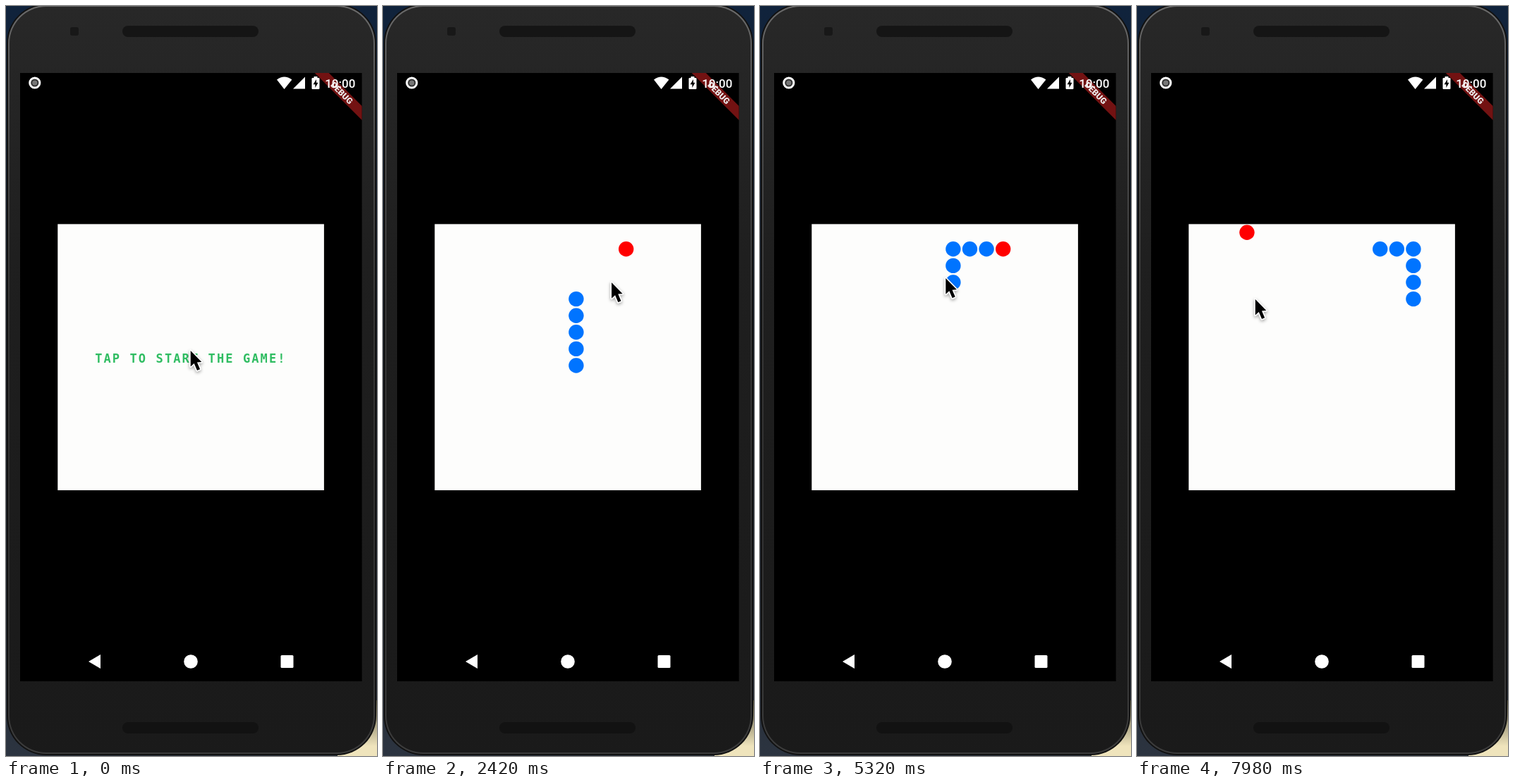
Animation, 526 px wide and 1064 px high, one loop 8 s. Source, as an HTML page with a canvas:

```html
<!DOCTYPE html>
<html lang="en">
<head>
<meta charset="utf-8">
<title>Snake</title>
<style>
html, body { margin: 0; width: 100%; height: 100%; overflow: hidden; background: #000; }
canvas { display: block; width: 526px; height: 1064px; }
</style>
</head>
<body>
<canvas id="stage" width="526" height="1064"></canvas>
<script>
const ctx = document.getElementById('stage').getContext('2d');
const LOOP = 8000, START = 660, TICK = 600;
const BOARD = { x: 73.3, y: 309.4, size: 377.6 }, CELL = BOARD.size / 16;
const FOODS = [[11, 1], [3, 0]];

// pointer stops: time, x, y
const POINTER = [
  [0, 262, 488], [800, 262, 488], [1450, 291, 458], [1800, 291, 458], [2900, 347, 346],
  [4700, 347, 346], [5700, 224, 404], [6000, 224, 404], [6600, 313, 419],
  [6950, 313, 419], [7800, 168, 415], [8000, 168, 415]
];

function fill(color) { ctx.fillStyle = color; ctx.fill(); }

function disc(x, y, r, color) {
  ctx.beginPath();
  ctx.arc(x, y, r, 0, Math.PI * 2);
  fill(color);
}

function poly(points, color) {
  ctx.beginPath();
  points.forEach(([x, y]) => ctx.lineTo(x, y));
  ctx.closePath();
  fill(color);
}

function box(x, y, w, h, r, color) {
  ctx.beginPath();
  ctx.roundRect(x, y, w, h, r);
  fill(color);
}

function gradient(x0, y0, x1, y1, ...colors) {
  const g = ctx.createLinearGradient(x0, y0, x1, y1);
  colors.forEach((c, i) => g.addColorStop(i / (colors.length - 1), c));
  return g;
}

function drawPhone() {
  ctx.fillStyle = gradient(0, 0, 0, 1064, '#10233c', '#151a22', '#2c3440');
  ctx.fillRect(0, 0, 526, 1064);
  ctx.fillStyle = gradient(0, 985, 0, 1050, '#55523f', '#efe4bc');
  ctx.fillRect(470, 985, 56, 79);

  box(1, -3, 524, 1066, 56, '#111');
  box(3, -1, 520, 1062, 54, gradient(0, 0, 0, 1064, '#6a6a6a', '#4a4a4a', '#383838', '#333', '#333', '#3c3c3c'));
  box(5, 1, 516, 1058, 52, gradient(0, 0, 0, 1064, '#282828', '#1f1f1f', '#1c1c1c', '#1a1a1a'));

  box(165, 28, 193, 16, 8, '#151515');
  box(165, 1016, 193, 16, 8, '#121212');
  box(91, 30, 12, 12, 3, '#181818');
  ctx.fillStyle = '#000';
  ctx.fillRect(20, 95, 484.6, 863);
}

function drawBanner() {
  ctx.save();
  ctx.beginPath();
  ctx.rect(20, 95, 484.6, 863);
  ctx.clip();
  ctx.translate(476.2, 123.4);
  ctx.rotate(Math.PI / 4);
  ctx.fillStyle = '#731212';
  ctx.fillRect(-60, -7.1, 120, 14.2);
  ctx.font = '900 12px Roboto, sans-serif';
  ctx.textAlign = 'center';
  ctx.fillStyle = '#eee';
  ctx.fillText('DEBUG', 0, 4.3);
  ctx.restore();
}

function drawStatus() {
  disc(40.8, 109, 8.6, '#fff');
  disc(40.8, 109, 5.6, '#333');
  disc(40.8, 109, 3.6, '#777');

  ctx.beginPath();
  ctx.moveTo(394.5, 118);
  ctx.lineTo(384, 104.6);
  ctx.quadraticCurveTo(394.5, 96.4, 405.4, 104.6);
  ctx.closePath();
  fill('#fff');
  poly([[424, 100.5], [424, 117.5], [407, 117.5]], '#fff');

  box(433.5, 102, 11, 16, 1.2, '#fff');
  box(436.5, 100, 5, 3, 0.5, '#fff');
  poly([[440, 104], [435.5, 111.2], [438.4, 111.2], [438.4, 116], [442.5, 108.8], [440, 108.8]], '#000');

  ctx.font = '500 17px Roboto, sans-serif';
  ctx.textAlign = 'right';
  ctx.fillStyle = '#fff';
  ctx.fillText('10:00', 495.3, 115.6);
}

function drawNav() {
  poly([[117, 930], [134, 920], [134, 940]], '#fff');
  disc(262, 930, 9.8, '#fff');
  box(389.5, 921, 18, 18, 1.5, '#fff');
}

function head(n) {
  const up = Math.min(n, 5), right = Math.min(Math.max(n - 5, 0), 5);
  return [8 + right, 6 - up + Math.max(n - 10, 0)];
}

function piece([col, row], color) {
  disc(BOARD.x + (col + 0.5) * CELL, BOARD.y + (row + 0.5) * CELL, 10.7, color);
}

function drawBoard(t) {
  ctx.fillStyle = '#fdfdfc';
  ctx.fillRect(BOARD.x, BOARD.y, BOARD.size, BOARD.size);
  if (t < START) {
    ctx.font = 'bold 17px "DejaVu Sans Mono", monospace';
    ctx.textAlign = 'left';
    ctx.letterSpacing = '2.1px';
    ctx.fillStyle = '#30bd62';
    ctx.fillText('TAP TO START THE GAME!', 126.2, 506);
    ctx.letterSpacing = '0px';
    return;
  }
  // eating adds a new head at once, so the snake gains a cell
  const tick = Math.floor((t - START) / TICK), eaten = tick >= 8 ? 1 : 0;
  const n = tick + eaten;
  piece(FOODS[eaten], '#f00');
  for (let i = 0; i < 5 + eaten; i++) piece(head(n - i), '#0074ff');
}

function drawPointer(t) {
  const i = POINTER.findIndex(p => p[0] > t);
  const [t0, x0, y0] = POINTER[i - 1], [t1, x1, y1] = POINTER[i];
  const u = (t - t0) / (t1 - t0), e = u * u * (3 - 2 * u);
  ctx.save();
  ctx.translate(x0 + (x1 - x0) * e - 0.3, y0 + (y1 - y0) * e + 1);
  ctx.beginPath();
  [[0, 0], [0, 22.5], [5, 18], [9.3, 28], [13.4, 26.2], [9.2, 16.4], [15.6, 16]]
    .forEach(([x, y]) => ctx.lineTo(x, y));
  ctx.closePath();
  ctx.lineJoin = 'round';
  ctx.lineWidth = 3.4;
  ctx.strokeStyle = '#fff';
  ctx.shadowColor = 'rgba(0,0,0,.35)';
  ctx.shadowBlur = 4;
  ctx.shadowOffsetY = 2;
  ctx.stroke();
  ctx.shadowColor = 'transparent';
  fill('#000');
  ctx.restore();
}

function frame() {
  const t = performance.now() % LOOP;
  drawPhone();
  drawBanner();
  drawStatus();
  drawNav();
  drawBoard(t);
  drawPointer(t);
  requestAnimationFrame(frame);
}
frame();
</script>
</body>
</html>
```
